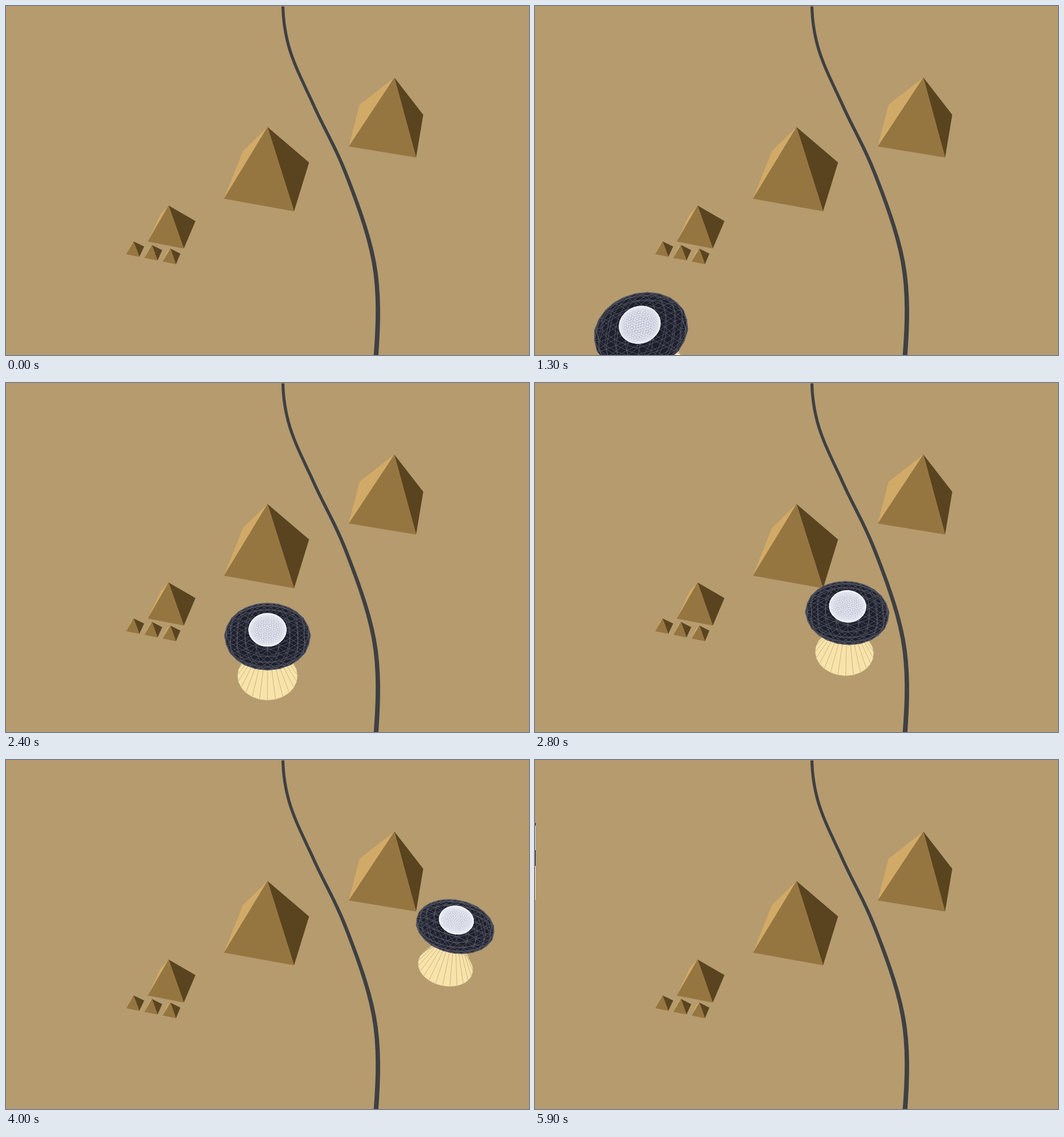
Recreate the animation shown at these times as an HTML page with a canvas. Size 900x600 px, loop 6 s.

```html
<!DOCTYPE html>
<html lang="en">
<head>
<meta charset="utf-8">
<title>Flight over the pyramids</title>
<style>
html, body { margin: 0; width: 100%; height: 100%; overflow: hidden; background: #b59b6e; }
canvas { display: block; }
</style>
</head>
<body>
<canvas id="stage" width="900" height="600"></canvas>
<script>
const ctx = document.getElementById('stage').getContext('2d');
const W = 900, H = 600, LOOP = 6000, STEP = 100, ENTRY = 500, MIDWAY = 2400;
const FOCAL = 1343, DROP = 135, TILT = Math.SQRT1_2;
const SIDE = 133, TURN = 14 * Math.PI / 180;

// World axes: x right, y up, z forward. The camera is pitched down 45 degrees.
function project([x, y, z]) {
  const k = FOCAL / (FOCAL + (z - y) * TILT);
  return [W / 2 + x * k, H / 2 + (DROP - (y + z) * TILT) * k];
}

// Offset along the common compass direction of all the buildings.
const turned = (x, z, right, ahead) => [
  x + right * Math.cos(TURN) + ahead * Math.sin(TURN),
  z - right * Math.sin(TURN) + ahead * Math.cos(TURN)
];

function polygon(points, color) {
  ctx.beginPath();
  points.forEach(p => ctx.lineTo(...p));
  ctx.closePath();
  ctx.fillStyle = color;
  ctx.fill();
}

function drawPyramid([x, z], side) {
  const h = side / 2;
  const corner = (right, ahead) => {
    const [cx, cz] = turned(x, z, right * h, ahead * h);
    return project([cx, 0, cz]);
  };
  const apex = project([x, side, z]);
  const nearLeft = corner(-1, -1), nearRight = corner(1, -1);
  polygon([apex, corner(-1, 1), nearLeft], '#d2aa67');
  polygon([apex, nearRight, corner(1, 1)], '#5a4420');
  polygon([apex, nearLeft, nearRight], '#967640');
}

// Ground points [x, z]; the first and last only steer the ends of the curve.
const riverKeys = [[50, 960], [37.5, 790], [51, 609], [98.4, 407], [149, 213], [182.4, -6], [168, -191], [130, -330]];

function drawRiver() {
  const spline = (a, b, c, d, t) =>
    b + t / 2 * (c - a + t * (2 * a - 5 * b + 4 * c - d + t * (3 * (b - c) + d - a)));
  const left = [], right = [];
  for (let i = 0; i + 3 < riverKeys.length; i++) {
    for (let t = 0; t <= 1; t += 0.125) {
      const [x, z] = [0, 1].map(axis => spline(...riverKeys.slice(i, i + 4).map(p => p[axis]), t));
      left.push(project([x - 3.6, 0, z]));
      right.unshift(project([x + 3.6, 0, z]));
    }
  }
  polygon(left.concat(right), '#3e4042');
}

function drawLand() {
  ctx.fillStyle = '#b59b6e';
  ctx.fillRect(0, 0, W, H);
  drawRiver();
  drawPyramid([241.5, 334.7], SIDE);
  drawPyramid([0, 192], SIDE);
  drawPyramid([-170, 63.6], SIDE / 2);
  for (const n of [-1, 0, 1]) drawPyramid(turned(-197.6, 11.2, n * SIDE / 4, 0), 24);
}

function icosphere(detail) {
  const p = (1 + Math.sqrt(5)) / 2;
  const unit = v => { const n = Math.hypot(...v); return v.map(c => c / n); };
  const points = [];
  for (const a of [-1, 1]) for (const b of [-p, p]) points.push([0, b, a], [b, a, 0], [a, 0, b]);
  const near = (i, j) => Math.hypot(...points[i].map((c, k) => c - points[j][k])) < 2.1;
  let faces = [];
  for (let i = 0; i < 12; i++) for (let j = i + 1; j < 12; j++) for (let k = j + 1; k < 12; k++)
    if (near(i, j) && near(j, k) && near(i, k)) faces.push([i, j, k]);
  const verts = points.map(unit);
  for (; detail > 0; detail--) {
    const cache = new Map();
    const middle = (i, j) => {
      const key = Math.min(i, j) + '-' + Math.max(i, j);
      if (!cache.has(key)) cache.set(key, verts.push(unit(verts[i].map((c, k) => c + verts[j][k]))) - 1);
      return cache.get(key);
    };
    faces = faces.flatMap(([a, b, c]) => {
      const ab = middle(a, b), bc = middle(b, c), ca = middle(c, a);
      return [[a, ab, ca], [b, bc, ab], [c, ca, bc], [ab, bc, ca]];
    });
  }
  const edges = new Map();
  for (const [a, b, c] of faces)
    for (const [i, j] of [[a, b], [b, c], [c, a]])
      edges.set(Math.min(i, j) + '-' + Math.max(i, j), [i, j]);
  return { verts, edges: [...edges.values()] };
}

function ellipsoid(detail, radius, height, lift) {
  const { verts, edges } = icosphere(detail);
  return { verts: verts.map(([x, y, z]) => [x * radius, y * height + lift, z * radius]), edges };
}

function cone(radius, top, bottom, sides) {
  const verts = [[0, top, 0]], edges = [];
  for (let i = 0; i < sides; i++) {
    const a = i / sides * Math.PI * 2;
    verts.push([radius * Math.sin(a), bottom, radius * Math.cos(a)]);
    edges.push([0, i + 1], [i + 1, (i + 1) % sides + 1]);
  }
  return { verts, edges };
}

const saucer = [
  { mesh: cone(55, 2, -112, 24), fill: '#f8e3aa', line: '#b9a374', width: 0.7, smear: '#f8e3aa' },
  { mesh: ellipsoid(2, 74, 10, 2), fill: '#1d1f2c', line: '#5b5e69', width: 0.8, smear: '#1d1f2c' },
  { mesh: ellipsoid(3, 32, 21, 17), fill: '#a9adbd', line: '#f5f6ff', width: 0.55, smear: '#c6cee9' }
];

function hull(points) {
  const sorted = [...points].sort((a, b) => a[0] - b[0] || a[1] - b[1]);
  const chain = list => {
    const out = [];
    for (const p of list) {
      while (out.length > 1) {
        const [a, b] = out.slice(-2);
        if ((b[0] - a[0]) * (p[1] - a[1]) - (b[1] - a[1]) * (p[0] - a[0]) > 0) break;
        out.pop();
      }
      out.push(p);
    }
    return out.slice(0, -1);
  };
  return chain(sorted).concat(chain(sorted.reverse()));
}

// Whatever lies past the right edge collapses into the first column, one row down.
function smearOverflow(outline, color) {
  const ys = [];
  outline.forEach((a, i) => {
    const b = outline[(i + 1) % outline.length];
    if (a[0] >= W) ys.push(a[1]);
    if ((a[0] < W) !== (b[0] < W)) ys.push(a[1] + (b[1] - a[1]) * (W - a[0]) / (b[0] - a[0]));
  });
  if (!ys.length) return;
  const top = Math.round(Math.min(...ys)) + 1, bottom = Math.round(Math.max(...ys)) + 1;
  ctx.fillStyle = color;
  ctx.fillRect(0, top, 1, bottom - top);
}

function drawPart({ mesh, fill, line, width, smear }, x, z) {
  const points = mesh.verts.map(v => project([v[0] + x, v[1], v[2] + z]));
  const outline = hull(points);
  polygon(outline, fill);
  ctx.beginPath();
  for (const [i, j] of mesh.edges) {
    ctx.moveTo(...points[i]);
    ctx.lineTo(...points[j]);
  }
  ctx.strokeStyle = line;
  ctx.lineWidth = width;
  ctx.stroke();
  smearOverflow(outline, smear);
}

const start = performance.now();

function frame() {
  const t = Math.floor((performance.now() - start) % LOOP / STEP) * STEP;
  drawLand();
  if (t >= ENTRY) {
    const steps = (t - MIDWAY) / STEP;
    saucer.forEach(part => drawPart(part, 22.4 * steps, 13.3 * steps));
  }
  requestAnimationFrame(frame);
}
frame();
</script>
</body>
</html>
```
